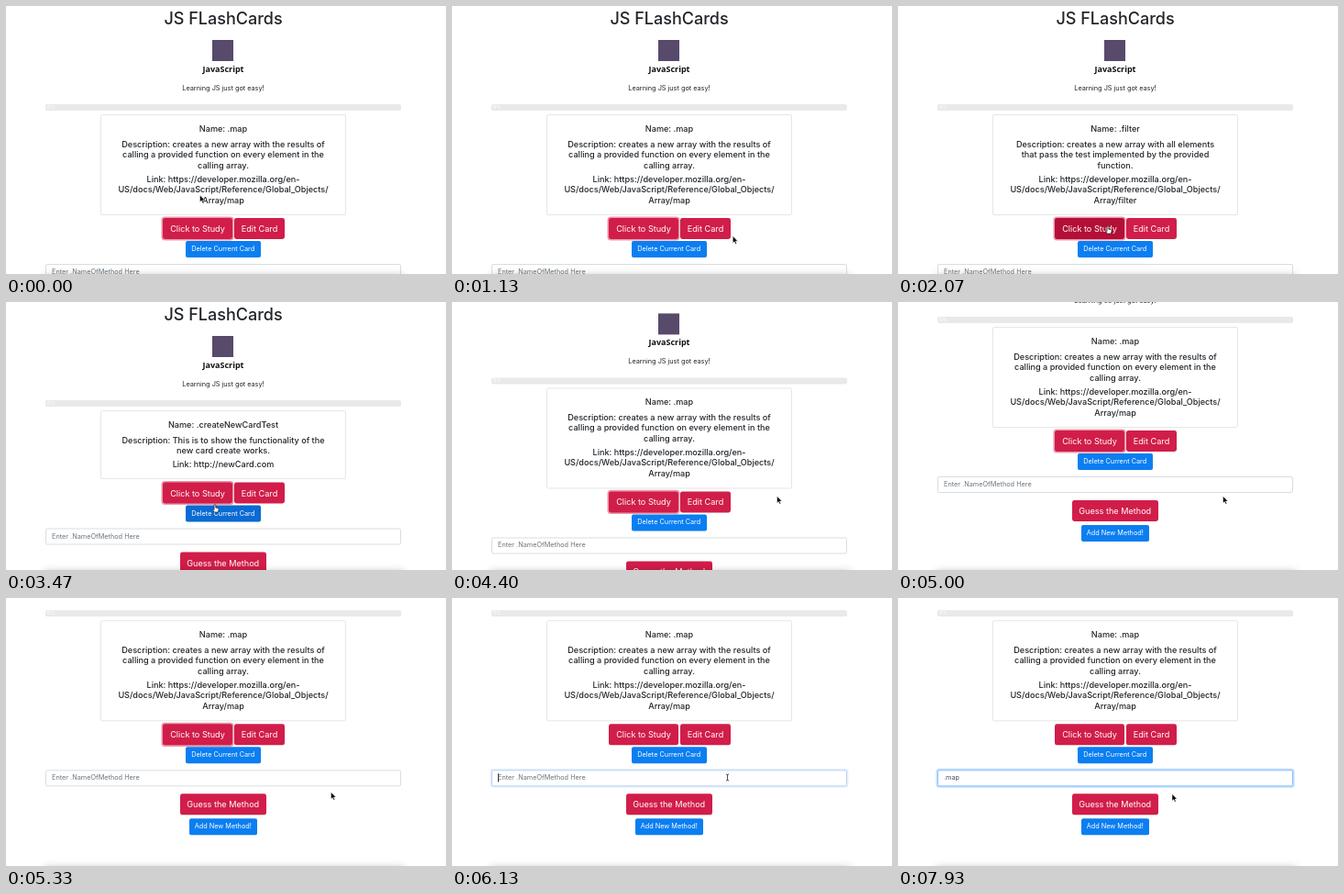
Write an HTML page that moves like this. It is 480 px wide and 292 px high and loops after 8000 ms.

```html
<!DOCTYPE html>
<html lang="en">
<head>
<meta charset="utf-8">
<title>JS flash cards</title>
<style>
html, body { margin: 0; width: 100%; height: 100%; overflow: hidden; background: #fff; }
#stage { position: relative; width: 480px; height: 292px; overflow: hidden;
  font: 7.3px Inter, "Liberation Sans", sans-serif; color: #212529; }
#stage div, #stage svg { position: absolute; box-sizing: border-box; }
#page, #rest { left: 0; top: 0; width: 480px; }
.line { left: 0; width: 474px; text-align: center; white-space: pre; }
.title { top: 2px; font-size: 18px; font-weight: 500; line-height: 24px; }
.mark { left: 225px; top: 37px; width: 23px; height: 23px; background: #574a6b; }
.word { top: 62px; font: 700 9px/14px "Open Sans", sans-serif; color: #111; }
.lead { top: 83.5px; line-height: 12px; }
.bar { left: 43px; top: 107px; width: 388px; height: 6.5px; border-radius: 2px;
  background: #e9e9ec; color: #fff; font-size: 5.4px; line-height: 7px; padding-left: 2px; }
#card { left: 103px; top: 118px; width: 268px; padding: 8.75px 0 9.25px;
  border: 1px solid #e6e6e6; border-radius: 2px;
  font-size: 9.12px; font-weight: 500; line-height: 11.5px; text-align: center; white-space: pre; }
#card p { margin: 0 0 3.5px; }
#card p:first-child { margin-bottom: 5.5px; }
#card p:last-child { margin: 0; }
.btn { color: #fff; text-align: center; white-space: pre; border-radius: 2px; background: #0b7ef1; }
.btn.hover { background: #0a6bd2; }
.big { font-size: 9.12px; border-radius: 2.4px; background: #d11d49; }
.big.hover { background: #b30f37; }
.big.focus { box-shadow: 0 0 0 1.6px #eb9aac; }
#field { --k: 0; left: 43px; top: 281px; width: 388px; height: 18px; line-height: 16px; padding-left: 6px;
  background: #fff; border: 1px solid color-mix(in srgb, #8cc3fc calc(var(--k) * 100%), #d9dde1);
  box-shadow: 0 0 0 1.5px rgba(0, 123, 255, calc(var(--k) * .25));
  border-radius: 2px; color: #6c757d; white-space: pre; }
#field.filled { color: #495057; }
#caret { display: inline-block; width: .8px; height: 8.5px; margin-right: -.8px;
  vertical-align: -1.5px; background: #222; }
.shade { left: 42px; top: 294px; width: 392px; height: 10px; box-shadow: 0 0 10px rgba(0,0,0,.28); }
#stage svg { left: 0; top: 0; overflow: visible; }
</style>
</head>
<body>
<div id="stage">
  <div id="page">
    <div class="line title">JS FLashCards</div>
    <div class="mark"></div>
    <div class="line word">JavaScript</div>
    <div class="line lead">Learning JS just got easy!</div>
    <div class="bar">0%</div>
    <div id="card"><p></p><p></p><p></p></div>
    <div id="rest"><div id="field"><span id="before"></span><span id="caret"></span><span id="after"></span></div></div>
  </div>
  <div class="shade"></div>
  <svg width="1" height="1">
    <path id="arrow" d="M0 0V7.6L1.8 6.1 3 8.8 4.2 8.2 3.1 5.6H5.4Z" fill="#000" stroke="#fff" stroke-width=".5"/>
    <path id="hand" d="M-.9 4.6V-1Q0-1.9 .8-1V2.1L3.5 2.8Q4.2 3 4 4.2L3.3 7H-.7L-2.7 4Q-2.3 3-.9 4.6Z" fill="#fff" stroke="#111" stroke-width=".6"/>
    <path id="beam" d="M-1.5-3.5Q0-3.5 0-2.7Q0-3.5 1.5-3.5M0-2.7V2.7M-1.5 3.5Q0 3.5 0 2.7Q0 3.5 1.5 3.5" fill="none" stroke="#222" stroke-width=".8"/>
  </svg>
</div>
<script>
const $ = id => document.getElementById(id);
const LOOP = 8000;
const docs = "Link: https://developer.mozilla.org/en-\nUS/docs/Web/JavaScript/Reference/Global_Objects/\nArray/";
const map = ["Name: .map",
  "Description: creates a new array with the results of\ncalling a provided function on every element in the\ncalling array.",
  docs + "map"];
const filter = ["Name: .filter",
  "Description: creates a new array with all elements\nthat pass the test implemented by the provided\nfunction.",
  docs + "filter"];
const custom = ["Name: .createNewCardTest",
  "Description: This is to show the functionality of the\nnew card create works.",
  "Link: http://newCard.com"];

// [time, value...]: the first two lists hold, the others are interpolated
const cards = [[0, map], [1870, filter], [2770, custom], [3900, map]];
const typed = [[0, ""], [6870, "."], [7130, ".m"], [7270, ".ma"], [7430, ".map"]];
const scroll = [[4200, 0], [4330, 12], [4500, 42], [4670, 68], [4800, 81], [5000, 91], [5330, 93.7]];
const glow = [[6070, 0], [6220, 1]];
const pointer = [[70, 211.5, 206], [200, 198, 216], [400, 262, 240], [730, 373, 257],
  [930, 373, 257], [1150, 300, 250], [1400, 229, 241], [3200, 229, 241], [3470, 228, 222],
  [3730, 227, 212], [3930, 227, 212], [4250, 354.5, 211.5], [5530, 354.5, 211.5],
  [5930, 300.5, 195.5], [7800, 300.5, 195.5], [7930, 299, 213.5]];

const hold = (keys, t) => keys.filter(k => k[0] <= t).pop()[1];
function tween(keys, t) {
  const i = keys.findIndex(k => k[0] > t);
  if (i < 0) return keys[keys.length - 1].slice(1);
  if (i === 0) return keys[0].slice(1);
  const [a, b] = [keys[i - 1], keys[i]];
  const u = (t - a[0]) / (b[0] - a[0]);
  return a.slice(1).map((v, j) => v + (b[j + 1] - v) * u);
}

function button(text, x, y, w, h, big) {
  const el = document.createElement("div");
  el.className = big ? "btn big" : "btn";
  el.textContent = text;
  el.style.cssText = `left:${x}px;top:${y}px;width:${w}px;height:${h}px;line-height:${h}px`;
  $("rest").append(el);
  return { el, x, y, w, h };
}
const study = button("Click to Study", 171, 231, 76, 23, true);
const buttons = [study,
  button("Edit Card", 249, 231, 55, 23, true),
  button("Delete Current Card", 196, 256, 81.5, 18),
  button("Guess the Method", 189.5, 307, 94.5, 23, true),
  button("Add New Method!", 199.5, 333.5, 74.5, 18)];

function draw(t) {
  const card = hold(cards, t), text = hold(typed, t);
  const [top] = tween(scroll, t), [px, py] = tween(pointer, t);
  const lift = card === custom ? -34.5 : 0;
  const focused = t >= 6070;

  [...$("card").children].forEach((p, i) => p.textContent = card[i]);
  $("page").style.transform = `translateY(${-top}px)`;
  $("rest").style.transform = `translateY(${lift}px)`;

  let over = false;
  for (const b of buttons) {
    const y = b.y + lift - top;
    const hit = px >= b.x && px <= b.x + b.w && py >= y && py <= y + b.h;
    b.el.classList.toggle("hover", hit);
    over = over || hit;
  }
  study.el.classList.toggle("focus", !focused);

  $("field").style.setProperty("--k", tween(glow, t)[0]);
  $("field").classList.toggle("filled", text !== "");
  $("before").textContent = text;
  $("after").textContent = text ? "" : "Enter .NameOfMethod Here";
  const caretOn = focused && t < 7870 && !(t >= 6570 && t < 6870);
  $("caret").style.visibility = caretOn ? "visible" : "hidden";

  const inField = t > 5600 && py > 188 && py < 206;
  const kind = inField ? "beam" : over ? "hand" : "arrow";
  const hidden = t >= 6870 && t < 7800;
  for (const id of ["arrow", "hand", "beam"]) {
    $(id).style.display = id === kind && !hidden ? "" : "none";
    $(id).setAttribute("transform", `translate(${px} ${py})`);
  }
}

const start = performance.now();
function tick() {
  draw((performance.now() - start) % LOOP);
  requestAnimationFrame(tick);
}
tick();
</script>
</body>
</html>
```
